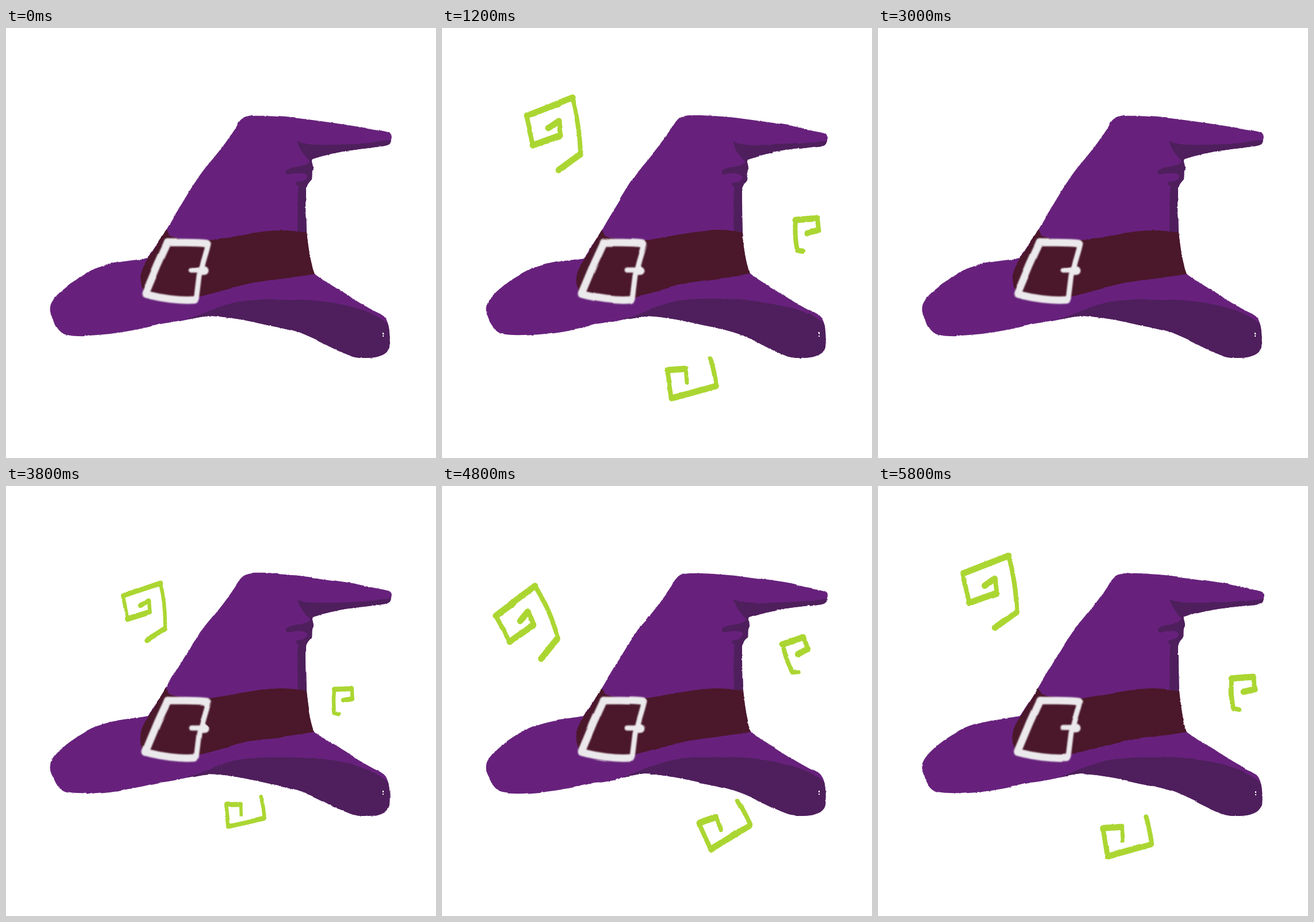
Recreate the animation shown at these times as an HTML page. Size 748 by 748 pixels, loop 6010 ms.

```html
<!DOCTYPE html>
<html lang="en">
<head>
<meta charset="utf-8">
<title>Witch hat</title>
<style>
  html, body { margin: 0; width: 100%; height: 100%; overflow: hidden; background: #fff; }
  svg { display: block; width: 100vw; height: 100vh; }
  .shade { fill: #4e1f5c; }
  .line { fill: none; stroke-linecap: round; stroke-linejoin: round; }
  #swirls { stroke: #abd632; }
  .buckle { stroke: #ebe9eb; }
</style>
</head>
<body>
<svg viewBox="0 0 748 748">
  <defs>
    <!-- rough: wobble plus a grainy brush edge; wobble: the same without grain -->
    <filter id="rough" filterUnits="userSpaceOnUse" x="0" y="0" width="748" height="748" color-interpolation-filters="sRGB">
      <feTurbulence class="noise" type="fractalNoise" baseFrequency=".016" result="slow"/>
      <feTurbulence class="noise" type="fractalNoise" baseFrequency=".3" result="grain"/>
      <feDisplacementMap in="SourceGraphic" in2="slow" scale="4" xChannelSelector="R" yChannelSelector="G" result="bent"/>
      <feDisplacementMap in="bent" in2="grain" scale="2.5" xChannelSelector="R" yChannelSelector="G"/>
    </filter>
    <filter id="wobble" filterUnits="userSpaceOnUse" x="0" y="0" width="748" height="748" color-interpolation-filters="sRGB">
      <feTurbulence class="noise" type="fractalNoise" baseFrequency=".016" result="slow"/>
      <feGaussianBlur in="SourceGraphic" stdDeviation=".8" result="soft"/>
      <feDisplacementMap in="soft" in2="slow" scale="4" xChannelSelector="R" yChannelSelector="G"/>
    </filter>
    <path id="shape" d="M77 485C79 470 105 447 133 431C155 416 180 410 205 406C220 404 238 402 247 400L278 352C293 326 308 302 322 279C334 260 343 247 357 231C374 211 387 193 399 175C407 160 413 153 428 152C455 151 485 154 510 156C545 161 580 165 608 170C630 176 648 178 664 182C671 184 672 188 670 194C669 202 667 203 660 205C640 208 610 211 585 215C565 219 547 223 533 228C530 232 534 236 534 244C530 250 532 258 531 264C526 270 522 274 522 280C522 305 522 330 523 356C526 385 530 410 536 427C548 437 565 446 585 459C605 472 625 484 640 492C652 497 660 502 662 508C668 520 668 540 667 555C664 567 652 571 640 573C620 575 608 574 598 570C575 562 548 545 525 536C505 527 480 522 455 517C420 509 380 501 352 501C320 505 295 513 265 516C235 524 205 529 180 532C150 535 125 537 105 533C92 530 84 516 81 505C77 498 76 492 77 485Z"/>
    <clipPath id="inside"><use href="#shape"/></clipPath>
  </defs>

  <g filter="url(#rough)">
    <g id="swirls" class="line">
      <path stroke-width="8" d="M184 175L203 161L206 187L158 204L146 154L226 122Q239 165 241 219L203 248
        M467 575Q474 598 477 622L400 645L392 595L424 592
        M628 388L618 386Q613 362 615 335L653 331L655 352L636 357"/>
      <path stroke-width="11" d="M185 174L202 162M205 187L158 204M147 153L226 122M240 220L203 247
        M475 623L401 644M394 595L422 593
        M615 334L652 331M654 353L636 357"/>
      <path stroke-width="7" d="M424 592L426 617"/>
    </g>
    <use href="#shape" fill="#67217c"/>
    <g clip-path="url(#inside)">
      <path class="shade" d="M506 197C520 203 545 204 575 203C610 202 640 201 675 194V212L533 230L531 234C520 224 511 212 506 197Z"/>
      <path class="shade" d="M488 247C500 240 515 242 524 236L531 231L540 240L536 264L523 280L526 358L507 353C508 330 506 300 509 276C503 274 503 270 508 268C518 268 522 264 523 258C517 250 505 252 490 255C486 252 486 250 488 247Z"/>
      <path class="shade" d="M316 506C345 498 375 481 405 476C455 469 530 471 580 480C620 488 650 499 672 522L680 590H560L350 530Z"/>
    </g>
    <path fill="#4b172a" d="M278 351L284 362C310 372 340 371 357 369C400 362 440 353 475 352C495 352 510 354 523 356C526 385 530 410 537 428C505 433 470 437 430 443C400 449 370 460 338 467C300 472 265 468 240 460C230 445 231 425 247 402L262 378Z"/>
    <path fill="#fff" d="M655 530h2v3h-2zM655 535h2v2h-2z"/>
  </g>

  <g class="line buckle" filter="url(#wobble)">
    <path stroke-width="13" d="M281 373C305 374 328 372 349 375M243 463C268 470 302 475 328 473"/>
    <path stroke-width="13" d="M281 374L264 411L243 461"/>
    <path stroke-width="9" d="M352 375C349 390 344 402 341 416L336 430L331 471M322 421H335"/>
    <path stroke-width="15" d="M341 422L345 422"/>
  </g>
</svg>
<script>
  const STEP = 200, LOOP = 6010, POSES = 15, LAST = 29;
  const CENTER = 387;
  // swing of the swirls in degrees, one value per pose
  const swing = [0, -15.3, -14, -9.3, 2.8, 7.4, 0, -7.5, -13, -15.3, -14, -9.4, 1.2, 8.2, 0.2];
  const swirls = document.getElementById('swirls');
  const noises = document.querySelectorAll('.noise');
  let shown = -1;

  function pose(p) {
    const size = Math.min(1, p / 5);
    swirls.style.display = p ? '' : 'none';
    swirls.setAttribute('transform',
      `translate(${CENTER} ${CENTER}) rotate(${swing[p]}) scale(${size}) translate(${-CENTER} ${-CENTER})`);
    noises.forEach(n => n.setAttribute('seed', p * 7 + 3));
  }

  const start = performance.now();
  function tick() {
    const t = (performance.now() - start) % LOOP;
    const p = Math.min(LAST, Math.floor(t / STEP)) % POSES;
    if (p !== shown) pose(shown = p);
    requestAnimationFrame(tick);
  }
  tick();
</script>
</body>
</html>
```
